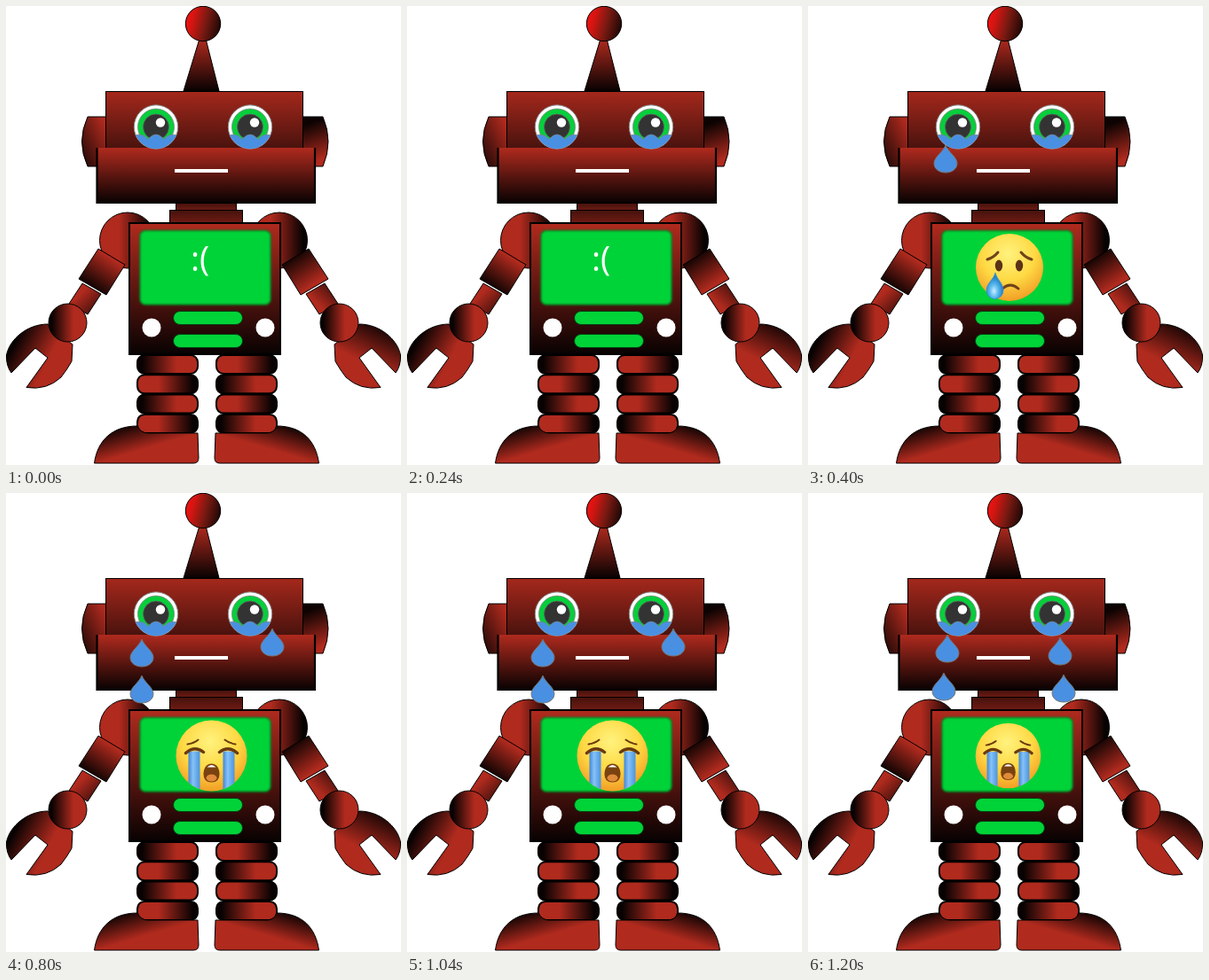
An HTML page for the animation above (1600 ms loop, 445 by 518 pixels).

```html
<!DOCTYPE html>
<html lang="en">
<head>
<meta charset="utf-8">
<title>Sad robot</title>
<style>
  html, body { margin: 0; width: 100%; height: 100%; overflow: hidden; background: #fff; }
  svg { display: block; width: 100%; height: 100%; }
  text { font-family: "Open Sans", sans-serif; }
</style>
</head>
<body>
<svg viewBox="0 0 445 518">
  <defs>
    <linearGradient id="right"><stop offset=".08" stop-color="#080202"/><stop offset=".65" stop-color="#b02a1e"/></linearGradient>
    <linearGradient id="left"><stop offset=".35" stop-color="#b02a1e"/><stop offset=".92" stop-color="#080202"/></linearGradient>
    <linearGradient id="down" x2="0" y2="1"><stop stop-color="#b02a1e"/><stop offset="1" stop-color="#080202"/></linearGradient>
    <linearGradient id="brow" x2="0" y2="1"><stop stop-color="#a5281c"/><stop offset="1" stop-color="#47120d"/></linearGradient>
    <linearGradient id="neck" x2="0" y2="1"><stop stop-color="#46120d"/><stop offset="1" stop-color="#701c14"/></linearGradient>
    <linearGradient id="earL" x1=".9" y1=".1" x2=".1" y2=".9"><stop stop-color="#b02a1e"/><stop offset="1" stop-color="#2a0b08"/></linearGradient>
    <linearGradient id="earR" x1=".4" x2=".6" y2="1"><stop offset=".1" stop-color="#0c0302"/><stop offset=".9" stop-color="#b02a1e"/></linearGradient>
    <linearGradient id="armL" x1=".8" y1=".1" x2=".25" y2=".9"><stop offset=".15" stop-color="#b02a1e"/><stop offset=".95" stop-color="#0c0302"/></linearGradient>
    <linearGradient id="armR" x1=".2" y1=".1" x2=".75" y2=".9"><stop offset=".05" stop-color="#0c0302"/><stop offset=".85" stop-color="#b02a1e"/></linearGradient>
    <linearGradient id="wristL" x2="1" y2="1"><stop offset=".35" stop-color="#b02a1e"/><stop offset="1" stop-color="#2a0b08"/></linearGradient>
    <linearGradient id="wristR" x1="1" x2="0" y2="1"><stop stop-color="#2a0b08"/><stop offset=".65" stop-color="#b02a1e"/></linearGradient>
    <linearGradient id="clawL" x1=".1" y1=".35" x2=".7" y2=".65"><stop stop-color="#080202"/><stop offset=".85" stop-color="#b02a1e"/></linearGradient>
    <linearGradient id="clawR" x1=".45" y1=".6" x2=".75" y2="0"><stop stop-color="#b02a1e"/><stop offset="1" stop-color="#080202"/></linearGradient>
    <linearGradient id="ball" y1=".4" y2=".65"><stop stop-color="#f01212"/><stop offset=".2" stop-color="#d31511"/><stop offset=".55" stop-color="#7a1a12"/><stop offset="1" stop-color="#1c0705"/></linearGradient>
    <linearGradient id="footL" y1=".1" x2=".5" y2=".7"><stop offset=".1" stop-color="#080202"/><stop offset=".9" stop-color="#b02a1e"/></linearGradient>
    <linearGradient id="footR" x1="1" y1=".1" x2=".5" y2=".7"><stop offset=".1" stop-color="#080202"/><stop offset=".9" stop-color="#b02a1e"/></linearGradient>
    <radialGradient id="skin" cx=".48" cy=".3" r=".72"><stop stop-color="#fff27e"/><stop offset=".55" stop-color="#fed943"/><stop offset="1" stop-color="#f19a24"/></radialGradient>
    <linearGradient id="stream"><stop stop-color="#3f86d8"/><stop offset=".4" stop-color="#86c2f6"/><stop offset="1" stop-color="#4a94e0"/></linearGradient>
    <radialGradient id="drip" cx=".45" cy=".7"><stop stop-color="#c9efff"/><stop offset=".5" stop-color="#5cb9ee"/><stop offset="1" stop-color="#2585cf"/></radialGradient>
    <filter id="soft"><feGaussianBlur stdDeviation=".8"/></filter>
    <clipPath id="lens"><circle r="24.500"/></clipPath>
    <clipPath id="disc"><circle r="40"/></clipPath>

    <path id="tear" d="M0 0C3 8 13 13.500 13 20.500C13 27 7 31 0 31S-13 27-13 20.500C-13 13.500-3 8 0 0Z" fill="#4a90e2" stroke="#77766f"/>

    <g id="eye">
      <circle r="24.700" fill="#fff" stroke="#888"/>
      <circle r="20.500" fill="#06cf3b" stroke="#777" stroke-width=".7"/>
      <circle r="14.500" fill="#333" stroke="#666" stroke-width=".7"/>
      <circle cx="5" cy="-5" r="5.200" fill="#fff"/>
      <path clip-path="url(#lens)" d="M-26 10Q-15 6-9 14Q0 3 9 14Q15 6 26 10V27H-26Z" fill="#4a90e2" stroke="#76858f" stroke-width=".8"/>
    </g>

    <g id="weep">
      <circle r="38" fill="url(#skin)"/>
      <g fill="none" stroke="#70421a" stroke-linecap="round" stroke-width="3">
        <path d="M-25-9Q-18-11-13-17M13-17Q18-11 25-9"/>
        <path d="M-8 24Q1 16 10 24"/>
      </g>
      <g fill="#5b3216">
        <ellipse cx="-12" cy="-2" rx="4.200" ry="6.500"/>
        <ellipse cx="11" cy="-2" rx="4.200" ry="6.500"/>
      </g>
      <path d="M-16 6C-14 14-7 18-7 26A9.500 9.500 0 0 1-26 26C-26 18-18 14-16 6Z" fill="url(#drip)" stroke="#2d8bd0" stroke-width=".7"/>
    </g>

    <g id="sob">
      <circle r="40" fill="url(#skin)"/>
      <g clip-path="url(#disc)" fill="url(#stream)">
        <path d="M-26-5H-13V40H-26Z"/>
        <path d="M13-5H26V40H13Z"/>
      </g>
      <g fill="none" stroke="#6b3a10" stroke-linecap="round">
        <path d="M-27-13Q-20-14-15-18M15-18Q20-14 27-13" stroke-width="2"/>
        <path d="M-29-3Q-19-12-9-4M9-4Q19-12 29-3" stroke-width="3.500"/>
      </g>
      <path d="M0 9C6 9 9 14 9 21Q9 30 0 30T-9 21C-9 14-6 9 0 9Z" fill="#7a4210"/>
      <path d="M-5 13Q0 8 5 13Z" fill="#fff"/>
      <ellipse cy="25" rx="6" ry="4" fill="#e08a3a"/>
    </g>
  </defs>

  <g stroke="#000">
    <path d="M218 37H225L240 96H200Z" fill="url(#down)"/>
    <circle cx="222" cy="20" r="19.700" fill="url(#ball)"/>
    <path d="M113 125H92Q79 153 92 181H113Z" fill="url(#earL)"/>
    <path d="M334 125H357Q369 153 357 181H334Z" fill="url(#earR)"/>
    <rect x="112.500" y="96.500" width="222" height="66" fill="url(#brow)"/>
    <rect x="191.500" y="222.500" width="68" height="9" fill="url(#neck)"/>
    <rect x="184.500" y="230.500" width="82" height="15" fill="url(#neck)"/>
    <path d="M103 160H348V222H103Z" fill="url(#down)" stroke="none"/>
    <path d="M102.500 160V222H348V160" fill="none" stroke-width="2.200"/>
  </g>
  <use href="#eye" x="169" y="136.500"/>
  <use href="#eye" x="275" y="136.500"/>
  <rect x="190" y="184" width="60" height="4" fill="#fff"/>

  <g id="arms" stroke="#000"></g>
  <g id="legs" stroke="#000" stroke-width="2"></g>
  <g stroke="#000">
    <path d="M99.500 516C103 490 120 474 148 474Q152 482 160 482H216L217 510Q217 516 211 516Z" fill="url(#footL)"/>
    <path d="M352.500 516C349 490 333 474 305 474Q302 482 294 482H236L235 510Q235 516 241 516Z" fill="url(#footR)"/>
  </g>

  <rect x="139" y="245" width="170" height="148" fill="url(#down)" stroke="#000" stroke-width="2"/>
  <rect x="151" y="253.500" width="147" height="83.500" rx="6" fill="#00d338" stroke="#087d25" stroke-width="1.500" filter="url(#soft)"/>
  <g fill="#00d338" stroke="#053d12">
    <rect x="188.500" y="344.500" width="78" height="15" rx="7.500"/>
    <rect x="188.500" y="370.500" width="78" height="15" rx="7.500"/>
  </g>
  <g fill="#fff">
    <circle cx="164" cy="363" r="10.500"/>
    <circle cx="292" cy="363" r="10.500"/>
  </g>
  <g id="show"></g>
</svg>
<script>
  const STEP = 400;
  const el = id => document.getElementById(id);
  const put = (id, x, y, scale = 1) =>
    `<use href="#${id}" transform="translate(${x} ${y}) scale(${scale})"/>`;
  const drops = (...tips) => tips.map(([x, y]) => put("tear", x, y)).join("");

  // Both arms share one outline; the shading differs per side.
  const arm = (side, shoulder, elbow, flip) => `<g transform="${flip}">
    <circle cx="137" cy="264.5" r="31.5" fill="url(#${shoulder})"/>
    <path d="M104 274L134 292L113 326L82 308Z" fill="url(#arm${side})"/>
    <path d="M86 313L107 325L92 348L71 336Z" fill="url(#wrist${side})"/>
    <path d="M47 359C24 359 4 376 .5 394Q0 406 6 414L33 386L47 397L23 430.5Q46 434 62 419Q69 410 74 401L75 382Z" fill="url(#claw${side})"/>
    <circle cx="69.5" cy="357.5" r="21.5" fill="url(#${elbow})"/>
  </g>`;
  // The right side is mirrored, so its gradients are named as seen before mirroring.
  el("arms").innerHTML = arm("L", "left", "right", "") +
    arm("R", "right", "left", "matrix(-1 0 0 1 445 0)")
      .replace("#armR", "#armFlip").replace("#wristR", "#wristFlip").replace("#clawR", "#clawFlip");
  for (const part of ["arm", "wrist", "claw"]) {
    const flipped = el(part + "R").cloneNode(true);
    flipped.id = part + "Flip";
    for (const end of ["x1", "x2"])
      flipped.setAttribute(end, 1 - (flipped.getAttribute(end) ?? 0));
    el(part + "R").replaceWith(flipped);
  }

  // Four stacked rings per leg, shaded from alternating sides.
  const ring = (x, row, shade) =>
    `<rect x="${x}" y="${394 + row * 22.3}" width="68" height="21" rx="8" fill="url(#${shade})"/>`;
  const shades = ["right", "left"];
  el("legs").innerHTML = [0, 1, 2, 3].map(row =>
    ring(148, row, shades[row % 2]) + ring(237, row, shades[(row + 1) % 2])).join("");

  const scenes = [
    '<text x="208" y="299" font-size="38" fill="#fff">:(</text>',
    put("weep", 227, 295) + drops([155, 157]),
    put("sob", 231.5, 296.5) + drops([153, 165], [153, 206], [300, 153]),
    put("sob", 225.5, 296.5, 0.92) + drops([157, 160], [153, 203], [284, 163], [288, 205])
  ];

  let shown = -1;
  const start = performance.now();
  function draw(now) {
    const next = Math.floor(Math.max(0, now - start) / STEP) % scenes.length;
    if (next !== shown) el("show").innerHTML = scenes[shown = next];
    requestAnimationFrame(draw);
  }
  draw(start);
</script>
</body>
</html>
```
